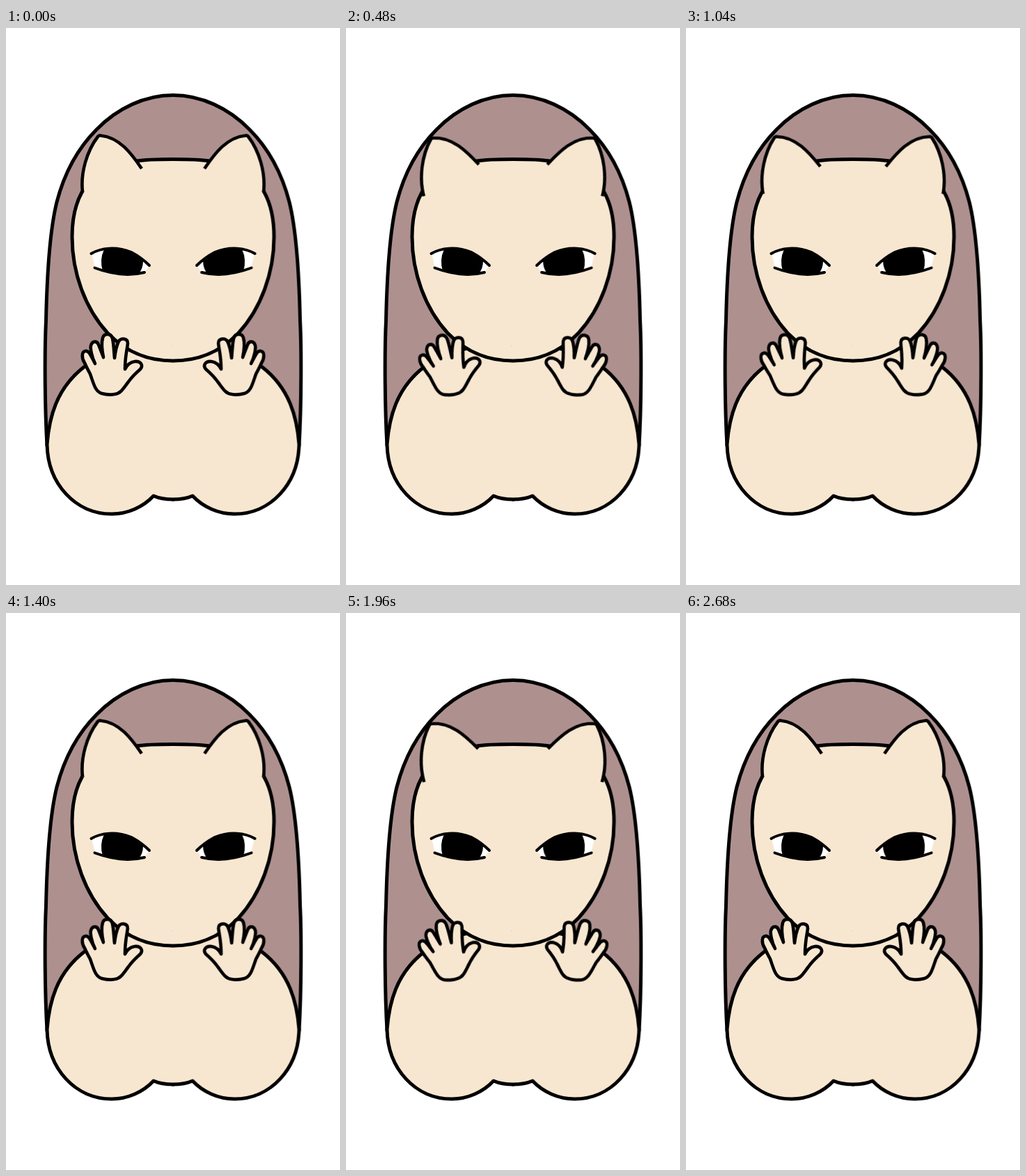
An HTML page that plays this animation: 480 by 800 pixels, repeating every 4000 ms.

```html
<!DOCTYPE html>
<html lang="en">
<head>
<meta charset="utf-8">
<title>Waving cat</title>
<style>
  html, body { margin: 0; width: 100%; height: 100%; overflow: hidden; background: #fff; }
  svg { display: block; width: 100%; height: 100%; }
  path { stroke: #000; stroke-width: 5; stroke-linejoin: round; }
  .hair { fill: #ae918f; }
  .skin { fill: #f8e7d0; }
  .white { fill: #fff; stroke: none; }
  .pupil { fill: #000; stroke: none; }
  .line { fill: none; }
  .plain { stroke: none; }
  .lash { fill: none; stroke-width: 4; stroke-linecap: round; }
  .ear, .hand { animation: tilt 4s cubic-bezier(.37, 0, .63, 1) infinite; }
  .ear { stroke-width: 4.6; transform-origin: 154px 226px; --turn: -10.6deg; }
  .hand { stroke-width: 4.6; transform-origin: 152px 500px; --turn: -10deg; }
  @keyframes tilt {
    0%, 33.5%, 67%, 100% { transform: rotate(0deg); }
    16.75%, 50.25% { transform: rotate(var(--turn)); }
  }
</style>
</head>
<body>
<svg viewBox="0 0 480 800">
  <g id="half">
    <path class="hair" d="M242 96.5H240C200 96.5 160 115 130 146C110 166 86 200 73 250C63 290 59 350 57.5 420C55.5 460 55.5 540 59 600H242"/>
    <path class="skin" d="M242 677H240C228 677 220 675.5 212 672C197 688 175 698 152 698C100 698 60 655 59 598C62 560 72 518 112 487C130 473 150 465 175 460L242 455"/>
    <path class="skin" d="M242 188.5H240C215 188.5 200 189 188 191C146 196 122 212 109 236C98 256 95 280 95 300C95 352 114 403 146 438C176 469 208 478 240 478H242"/>
    <path class="white" d="M123 323C136 316 158 314 180 322Q195 330 206 341L199 351C175 357 150 353 128 345Z"/>
    <path class="pupil" d="M141 318C158 314 180 320 197 335Q197 346 190 354C172 357 152 353 139 349Q134 333 141 318Z"/>
    <path class="lash" d="M122.500 324C136 316 158 313 180 322Q195 330 206 341M127.500 344.500C150 353 175 357 199 351"/>
    <path class="skin plain ear" d="M110 235C107 208 116 177 132 156Q133.500 154 136 154.500C163 157 180 180 195 202Q160 230 110 235"/>
    <path class="line ear" d="M110 235C107 208 116 177 132 156Q133.500 154 136 154.500C163 157 180 180 195 202"/>
    <path class="skin hand" d="M138 525C128 522 126 511 121 497C118 491 116 488 113 481C109 475 108 465 114 464C119 463 121 469 128 482C123 472 121 460 122 456C124 449 131 449 133 455L140 473C138 463 137 452 139 445C141 438 151 438 153 446C155 455 155 465 156 474C157 466 158 458 162 450C165 445 175 445 175 453C174 462 171 472 171 490C174 484 178 480 185 479C193 478 198 484 193 490C185 497 181 501 176 508C169 517 165 525 156 526C150 527 145 527 138 525Z"/>
  </g>
</svg>
<script>
  const half = document.getElementById('half');
  const mirror = half.cloneNode(true);
  mirror.id = 'mirror';
  mirror.setAttribute('transform', 'translate(480.2) scale(-1 1)');
  half.after(mirror);
</script>
</body>
</html>
```
